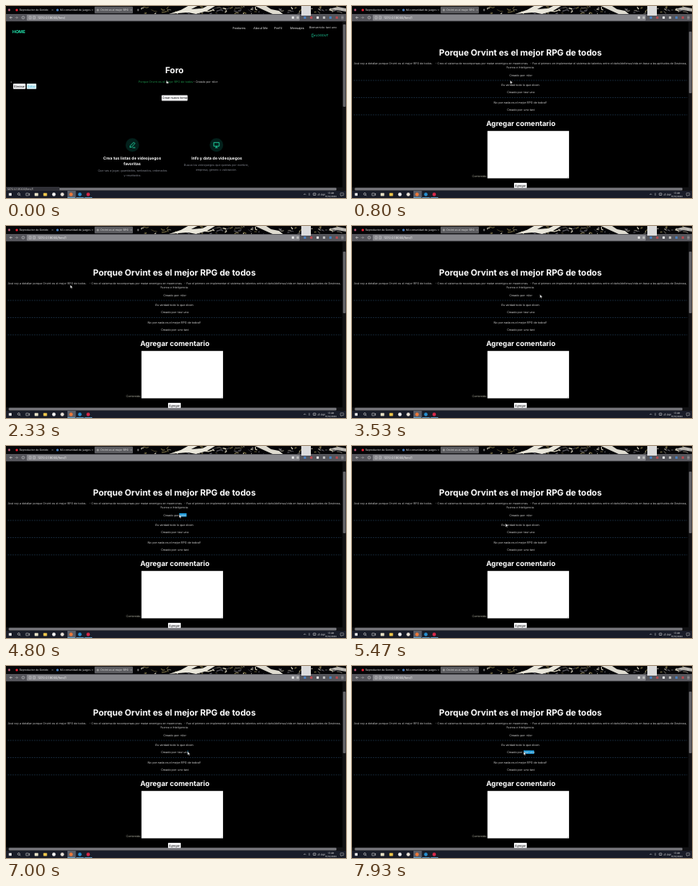
Animation of 426x240 px, one loop 8000 ms. Source, as an HTML page:

```html
<!DOCTYPE html>
<html lang="es">
<head>
<meta charset="utf-8">
<title>Foro</title>
<style>
html, body { margin: 0; width: 100%; height: 100%; overflow: hidden; background: #000; }
svg { display: block; width: 100vw; height: 100vh; }
text { font-family: Inter, sans-serif; text-rendering: geometricPrecision; white-space: pre; }
</style>
</head>
<body>
<svg id="stage" viewBox="0 0 426 240">
  <rect width="426" height="240" fill="#000"/>
  <g id="forum"></g>
  <g id="thread"></g>
  <g id="browser"></g>
  <g id="status"></g>
  <g id="taskbar"></g>
  <g id="cursor" fill="#fff" stroke="#000" stroke-width=".3">
    <path id="arrow" d="M0 0V4.3L1 3.4L1.7 4.9L2.4 4.6L1.7 3.2H3.1Z"/>
    <path id="hand" d="M0 0H.8V1.6L2.6 2V3.8H.3L-.9 2.2L0 2.5Z"/>
  </g>
</svg>
<script>
const LOOP = 8000, OPEN_AT = 760;
const $ = id => document.getElementById(id);

function add(parent, tag, attrs, content) {
  const el = document.createElementNS('http://www.w3.org/2000/svg', tag);
  for (const key in attrs) el.setAttribute(key, attrs[key]);
  if (content) el.textContent = content;
  return parent.appendChild(el);
}
const box = (g, x, y, width, height, fill, rx = 0) => add(g, 'rect', { x, y, width, height, fill, rx });
const dot = (g, cx, cy, r, fill) => add(g, 'circle', { cx, cy, r, fill });
const shape = (g, d, fill) => add(g, 'path', { d, fill });
const line = (g, d, stroke, width = .6) =>
  add(g, 'path', { d, stroke, 'stroke-width': width, fill: 'none' });
const label = (g, x, y, size, fill, content, anchor = 'start', weight = 400) =>
  add(g, 'text', { x, y, fill, 'font-size': size, 'text-anchor': anchor, 'font-weight': weight }, content);
const centered = (g, x, y, size, fill, content, weight) =>
  label(g, x, y, size, fill, content, 'middle', weight);

function button(g, x, y, width, height, content, fill = '#f4f4f6', ink = '#111') {
  box(g, x, y, width, height, fill, .7);
  centered(g, x + width / 2, y + height / 2 + 1.3, 3.7, ink, content);
}

function drawForum(g) {
  const teal = '#22e6ae';
  label(g, 8, 34.2, 5.3, teal, 'HOME', 'start', 700);
  [[284, 'Features'], [310, 'About Me'], [336, 'Perfil'], [356, 'Mensajes']]
    .forEach(([x, name]) => label(g, x, 29.3, 3.9, '#e4e4e4', name));
  label(g, 380, 28.3, 3.6, '#dcdcdc', 'Bienvenido: tavi uno');
  line(g, 'M385.5 35H383.3V38.7H385.5M384.8 36.9H387M386 35.9L387 36.9L386 37.9', teal, .5);
  label(g, 388, 38.3, 3.8, teal, 'LOGOUT');

  centered(g, 211, 84, 10.7, '#fff', 'Foro', 700);
  label(g, 166, 95.5, 3.65, '#1c8f48', 'Porque Orvint es el mejor RPG de todos');
  label(g, 265, 95.5, 3.6, '#cfcfcf', '- Creado por nilor', 'end');
  dot(g, 6.5, 95, .6, '#ccc');
  button(g, 9, 97, 15.5, 6.8, 'Eliminar');
  button(g, 26, 97, 12, 6.8, 'Editar', '#d9f4fb', '#48b5d8');
  button(g, 195, 111.5, 32.5, 7, 'Crear nuevo tema');

  [158.3, 263.7].forEach(x => dot(g, x, 173.8, 8.5, '#03201b'));
  line(g, 'M155.3 176.7L155.8 174.6L160 170.4L161.6 172L157.4 176.2ZM158.5 177H162', teal, .8);
  line(g, 'M260.3 170.7H267.1V175.2H260.3ZM263.7 175.2V177M262 177H265.4', teal, .8);

  centered(g, 158, 191.8, 4.95, '#fff', 'Crea tus listas de videojuegos', 700);
  centered(g, 158, 198.5, 4.95, '#fff', 'favoritas', 700);
  centered(g, 264, 191.8, 4.95, '#fff', 'Info y data de videojuegos', 700);
  const grey = '#80848e';
  centered(g, 158.5, 207, 3.6, grey, 'Que vas a jugar, guardados, rankeados, ordenados');
  centered(g, 158.5, 212.5, 3.6, grey, 'y reseñados.');
  centered(g, 263.5, 200.2, 3.6, grey, 'Busca los videojuegos que quieras por nombre,');
  centered(g, 263.5, 206, 3.6, grey, 'empresa, género o valoración.');
  drawScrollbars(g, 23, 103);
}

function drawScrollbars(g, top, height) {
  box(g, 421.5, 19, 4.5, 212, '#111113');
  box(g, 422.2, top, 3.4, height, '#66666a', 1);
  box(g, 0, 226.6, 426, 4.6, '#111113');
  box(g, 3.5, 227.3, 410.5, 3.2, '#77777c', 1);
}

function credit(g, y, name) {
  const text = add(g, 'text', { x: 211.5, y, fill: '#d6d6d6', 'font-size': 3.6, 'text-anchor': 'middle' });
  add(text, 'tspan', {}, 'Creado por: ');
  add(text, 'tspan', {}, name);
}

function selection(g, x, y, width) {
  const rect = box(g, x, y, width, 4.3, '#1f9fe0');
  return { rect, x, width };
}

function drawThread(g) {
  const body = '#cbcbcb';
  centered(g, 211, 61.6, 10.7, '#fff', 'Porque Orvint es el mejor RPG de todos', 700);
  label(g, 2.5, 73.2, 3.55, body, 'Acá voy a detallar porque Orvint es el mejor RPG de todos.');
  label(g, 104.5, 73.2, 3.5, body, '- Creo el sistema de recompensas por matar enemigos en mazmorras.');
  label(g, 419.5, 73.2, 3.5, body,
    '- Fue el primero en implementar el sistema de talentos entre el daño/defensa/vida en base a las aptitudes de Destreza,', 'end');
  centered(g, 211, 78.4, 3.5, body, 'Fuerza e Inteligencia.');
  const marks = [selection(g, 217, 84.1, 9.3), selection(g, 215, 105.5, 13.2)];
  credit(g, 87.5, 'nilor');
  centered(g, 211, 100.4, 3.6, '#d6d6d6', 'Es verdad todo lo que dicen');
  credit(g, 109, 'tavi uno');
  centered(g, 211, 122.2, 3.6, '#d6d6d6', 'No por nada es el mejor RPG de todos!!');
  credit(g, 130.8, 'uno tavi');
  [93, 114.5, 136].forEach(y =>
    line(g, `M2 ${y}H420`, '#203a52').setAttribute('stroke-dasharray', '2 1'));

  centered(g, 211.5, 149.8, 8.9, '#fff', 'Agregar comentario', 700);
  label(g, 150.5, 214.3, 3.6, '#b0b0a0', 'Contenido:');
  box(g, 169.7, 156.2, 102.2, 59.2, '#fff');
  line(g, 'M269.6 214.8L271.3 213.1M270.6 214.8L271.3 214.1', '#888', .3);
  drawScrollbars(g, 32, 77);
  button(g, 203, 221, 16, 6.6, 'Agregar');
  return marks;
}

function drawArtwork(g) {
  let seed = 11;
  const random = () => (seed = seed * 16807 % 2147483647) / 2147483647;
  for (let i = 0; i < 90; i++) {
    const x = 170 + random() * 250, y = random() * 10;
    line(g, `M${x} ${y}l${random() * 8 - 3} ${random() * 5 - 2}l${random() * 6 - 2} ${random() * 4 - 2}`,
      ['#d8d2bd', '#6d643f', '#55545c'][i % 3], .4 + random());
  }
  shape(g, 'M204 10L219 5L228 0H240L232 4L246 3L252 0H262L252 6L238 10L228 8Z', '#e9e6da');
  shape(g, 'M312 0H326L332 4L342 6L347 10H334L325 6Z', '#dedbd0');
  shape(g, 'M404 4L416 1L426 3V7L414 5Z', '#b9b6b0');
}

function drawBrowser(g) {
  box(g, 0, 0, 426, 19.4, '#050507');
  drawArtwork(g);
  box(g, 111, .8, 48, 8.4, '#5c5c60', 1);
  [
    [12, '#f02032', 'Reproductor de Sonido'],
    [63, '#4d83c4', 'Mi comunidad de juegos'],
    [113.5, '#999', 'Orvint es el mejor RPG']
  ].forEach(([x, color, title]) => {
    dot(g, x + 1.5, 5, 1.5, color);
    label(g, x + 4.8, 6.2, 3.3, '#e4e4e4', title);
  });
  dot(g, 4, 5, 1.4, '#b45a76');
  [57.5, 107.5, 156].forEach(x => line(g, `M${x} 4.2l1.6 1.6m0 -1.6l-1.6 1.6`, '#ccc', .35));
  line(g, 'M164 5H167M165.5 3.5V6.5', '#ddd', .45);
  box(g, 0, 10, 426, 9.2, '#55555b');
  box(g, 26, 11, 342, 7.2, '#86868b', 1);
  line(g, 'M6.5 12.8L4.8 14.5L6.5 16.2M4.8 14.5H8', '#eee', .5);
  line(g, 'M13 12.8L14.7 14.5L13 16.2M11.5 14.5H14.7', '#aaa', .5);
  add(g, 'circle', { cx: 21.5, cy: 14.5, r: 1.6, fill: 'none', stroke: '#eee', 'stroke-width': .5 });
  line(g, 'M29 13H31.4V16H29ZM34 13H36.5V16H34Z', '#eee', .4);
  const url = label(g, 40, 15.9, 3.7, '#fff', '');
  [358, 364, 373, 381, 389, 397, 405, 413].forEach((x, i) =>
    box(g, x, 13, 3, 3, ['#e0e0e0', '#bbb', '#4b80bd', '#b34a51'][i % 4], .7));
  line(g, 'M420 13H423M420 14.5H423M420 16H423', '#eee', .4);
  box(g, 370, 0, 12, 12, '#dcdcdc');
  line(g, 'M400 5H402.5M420 3.8l2.3 2.3m0 -2.3l-2.3 2.3', '#ddd', .4);
  add(g, 'rect', { x: 410, y: 3.8, width: 2.3, height: 2.3, fill: 'none', stroke: '#ddd', 'stroke-width': .4 });
  return url;
}

function drawTaskbar(g) {
  box(g, 0, 231, 426, 9, '#191c28');
  box(g, 77, 231, 10.5, 9, '#5a5e68');
  [77, 88, 98.5].forEach(x => box(g, x, 239.2, 9.5, .8, '#69aede'));
  box(g, 3.6, 233.8, 3.4, 3.4, '#eee');
  add(g, 'circle', { cx: 16, cy: 235, r: 1.4, fill: 'none', stroke: '#eee', 'stroke-width': .5 });
  line(g, 'M17 236L18.3 237.3', '#eee', .5);
  line(g, 'M25 234H28.3V237H25ZM29.5 234V237', '#ddd', .5);
  box(g, 35.8, 233.7, 4.6, 3.8, '#e6dfc4', .4);
  box(g, 46.8, 233.7, 4.6, 3.8, '#f0c64c', .4);
  [[60, '#f0f0f0'], [70.5, '#ece3d8'], [81.5, '#ee7838'], [92.5, '#278fd1'], [103, '#d72849']]
    .forEach(([x, color]) => dot(g, x, 235.5, 2.2, color));
  line(g, 'M373 236l1.3 -1.3l1.3 1.3M380 233.7V237M385 234H388V236.5H385ZM391 236.8V235.5M392.3 236.8V234.2', '#eee', .5);
  label(g, 394.5, 236.7, 3, '#eee', 'ESP');
  centered(g, 407, 234.8, 3, '#eee', '17:09');
  centered(g, 407, 238.5, 2.8, '#eee', '11/10/2023');
  line(g, 'M419 233.8H423V236.7H421L420 237.7V236.7H419Z', '#eee', .4);
}

drawForum($('forum'));
const marks = drawThread($('thread'));
const url = drawBrowser($('browser'));
box($('status'), 0, 226, 67, 5.2, '#303036');
label($('status'), 1.5, 229.8, 3.4, '#ddd', '127.0.0.1:8000/foro/1');
drawTaskbar($('taskbar'));

// time, x, y
const path = [
  [0, 201, 93], [760, 201, 93], [1050, 150, 91], [1450, 30, 80], [1600, 23.5, 78],
  [1850, 32, 75], [2330, 80.5, 73.5], [2700, 136, 74], [3150, 210, 77], [3530, 235.5, 85.5],
  [4000, 226.3, 85.5], [4350, 217, 85.5], [5100, 217, 85.5], [5500, 192, 97],
  [6130, 201.5, 97.5], [6600, 225, 101], [6950, 228.2, 107], [7350, 215, 107], [8000, 215, 107]
];

function pointerAt(time) {
  const i = Math.max(1, path.findIndex(step => step[0] > time));
  const [t0, x0, y0] = path[i - 1], [t1, x1, y1] = path[i];
  const k = (time - t0) / (t1 - t0), ease = k * k * (3 - 2 * k);
  return [x0 + (x1 - x0) * ease, y0 + (y1 - y0) * ease];
}

function select(mark, active, x) {
  const left = Math.max(mark.x, Math.min(mark.x + mark.width, x));
  mark.rect.setAttribute('x', left);
  mark.rect.setAttribute('width', active ? mark.x + mark.width - left : 0);
}

const show = (id, visible) => { $(id).style.display = visible ? '' : 'none'; };

function render(now) {
  const time = now % LOOP, opened = time >= OPEN_AT;
  const [x, y] = pointerAt(time);
  ['forum', 'status', 'hand'].forEach(id => show(id, !opened));
  ['thread', 'arrow'].forEach(id => show(id, opened));
  url.textContent = opened ? '127.0.0.1:8000/foro/1' : '127.0.0.1:8000/foro/';
  $('cursor').setAttribute('transform', `translate(${x} ${y})`);
  select(marks[0], time >= 4000 && time < 5150, x);
  select(marks[1], time >= 6950, x);
}

const start = performance.now();
function tick() {
  render(performance.now() - start);
  requestAnimationFrame(tick);
}
tick();
</script>
</body>
</html>
```
